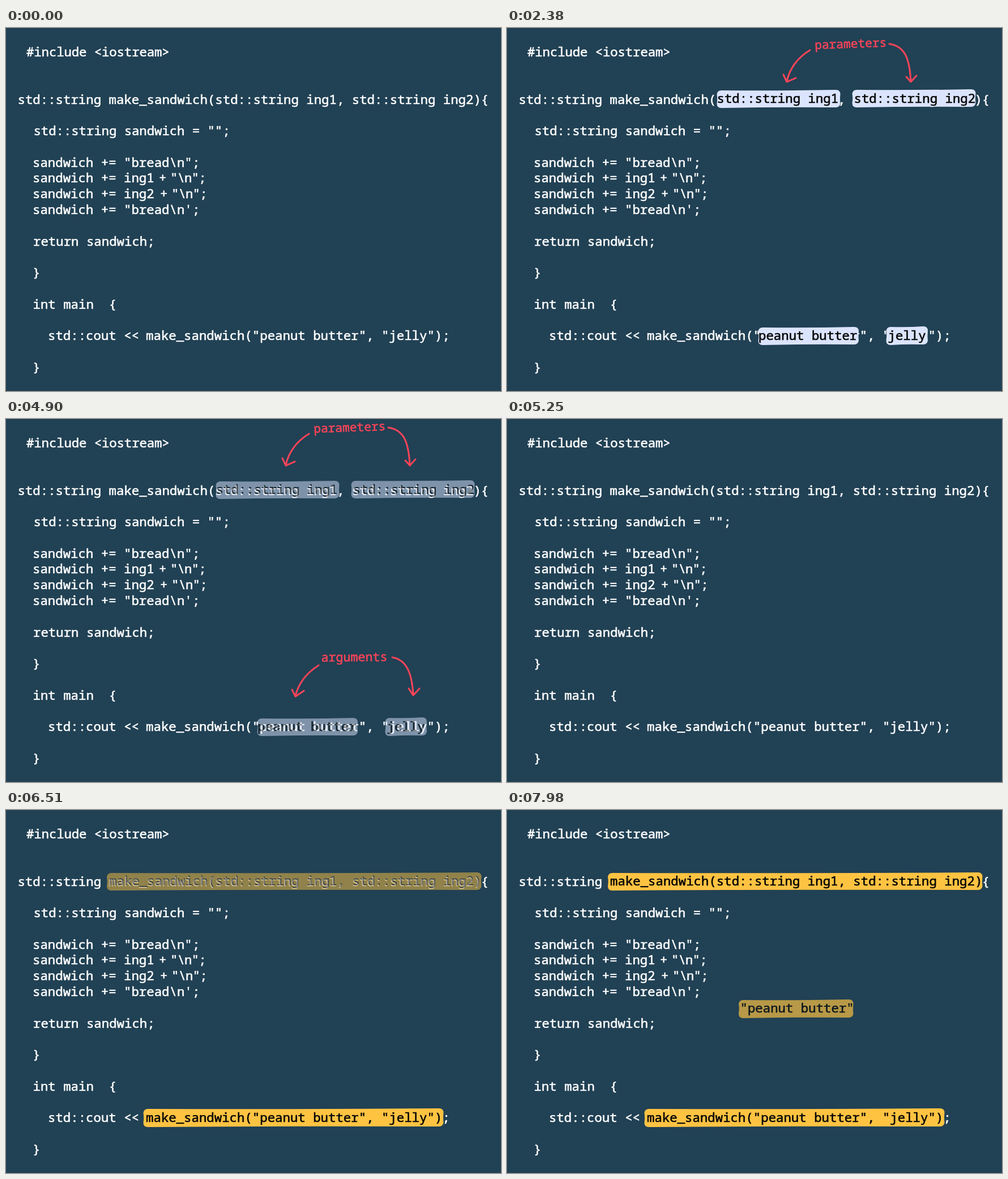
Animation of 874 by 640 pixels, one loop 8000 ms. Source, as an HTML page:

```html
<!DOCTYPE html>
<html lang="en">
<head>
<meta charset="utf-8">
<title>Parameters and arguments</title>
<style>
html, body { margin: 0; width: 100%; height: 100%; overflow: hidden; background: #214154; }
svg { display: block; }
text {
  font: 22.36px "Noto Sans Mono", "DejaVu Sans Mono", monospace; white-space: pre;
  stroke-width: .6px; stroke-linejoin: round;
}
</style>
</head>
<body>
<svg id="stage" width="874" height="640" viewBox="0 0 874 640"></svg>
<script>
const LOOP = 8000, STEP = 70;
const LAVENDER = '#dbe4fd', YELLOW = '#ffc342', RED = '#fa4459';
const stage = document.getElementById('stage');

function add(parent, tag, attrs = {}, content = '') {
  const node = document.createElementNS('http://www.w3.org/2000/svg', tag);
  for (const key in attrs) node.setAttribute(key, attrs[key]);
  node.textContent = content;
  return parent.appendChild(node);
}

const row = n => 50.2 + 27.78 * n;

// A thin outline gives the letters a marker-like weight
function write(parent, x, y, content, fill = '#fff', more = {}) {
  return add(parent, 'text', { x, y, fill, stroke: fill, ...more }, content);
}

// Rounded box with gently uneven edges
function bubble(parent, x, y, w, h, fill) {
  const r = 8, right = x + w, low = y + h, mid = x + w / 2;
  add(parent, 'path', { fill, d: `M${x + r} ${y + 1}
    Q${mid} ${y + 2} ${right - r} ${y} Q${right} ${y} ${right} ${y + r}
    Q${right - 1} ${y + h / 2} ${right} ${low - r} Q${right - 1} ${low - 1} ${right - r} ${low - 1}
    Q${mid} ${low - 2} ${x + r} ${low} Q${x} ${low} ${x} ${low - r}
    Q${x + 1.5} ${y + h / 2} ${x} ${y + r} Q${x + 1} ${y + 1} ${x + r} ${y + 1}Z` });
}

function highlight(box, fill, x, y, content) {
  const group = add(stage, 'g');
  bubble(group, ...box, fill);
  write(group, x, y, content, '#050505');
  return group;
}

function callout(label, x, y, turn, size, paths) {
  const group = add(stage, 'g');
  write(group, x, y, label, RED, {
    'text-anchor': 'middle', transform: `rotate(${turn} ${x} ${y})`, style: `font-size:${size}px`
  });
  add(group, 'path', { d: paths, fill: 'none', stroke: RED, 'stroke-width': 3,
    'stroke-linecap': 'round', 'stroke-linejoin': 'round' });
  return group;
}

const call = 'make_sandwich("peanut butter", "jelly")';
const code = [
  [36, 0, '#include <iostream>', -.12],
  [20.5, 3, 'std::string make_sandwich(std::string ing1, std::string ing2){'],
  [48.5, 5, 'std::string sandwich = "";', -.07],
  [47, 7, 'sandwich += "bread\\n";'],
  [47, 8, 'sandwich += ing1'],
  [47, 9, 'sandwich += ing2'],
  [47, 10, 'sandwich += "bread\\n\';'],
  [48, 12, 'return sandwich;'],
  [47, 14, '}'],
  [47.5, 16, 'int main  {'],
  [74, 18, 'std::cout <<'],
  [247, 18, call + ';'],
  [47, 20, '}']
];
for (const [x, n, content, spacing = 0] of code) {
  write(stage, x, row(n), content, '#fff', { 'letter-spacing': spacing });
}
for (const n of [8, 9]) {
  write(stage, 247 + 2 * n + 7, row(n), '+');
  write(stage, 267 + 2 * n + 7, row(n), '"\\n";', '#fff', { 'letter-spacing': -.9 });
}

const params = [
  highlight([370.5, 109, 218, 32], LAVENDER, 370.5, row(3) - 1.5, 'std::string ing1'),
  highlight([609.5, 108, 218, 32], LAVENDER, 612.5, row(3) - 1.5, 'std::string ing2')
];
const args = [
  highlight([443.5, 527, 177.5, 32], LAVENDER, 444, row(18), 'peanut butter'),
  highlight([669.5, 526, 73.5, 33], LAVENDER, 672.5, row(18) - .5, 'jelly')
];
const callBox = highlight([242.5, 526, 530, 33], YELLOW, 247, row(18) - .5, call);
const headBox = highlight([178, 110, 661.5, 32], YELLOW, 182, row(3) - 1,
  'make_sandwich(std::string ing1, std::string ing2)');

const paramNote = callout('parameters', 607, 35, -2, 21.2,
  'M535 39Q502 59 494 94M488 82L494 95L510 88M675 28C704 32 711 57 713 94M705 86L713 95L723 84');
const argNote = callout('arguments', 615, 457, -.5, 21.7,
  'M552 464Q519 485 511 518M505 507L511 519L526 509M682 450C709 454 717 482 719 516M711 505L719 517L730 505');

const moving = highlight([409, 334, 202.5, 33], YELLOW, 411.5, 357, '"peanut butter"');

const clamp = v => Math.max(0, Math.min(1, v));
const fade = (t, start) => clamp((t - start + 35) / 70);
const show = (node, alpha) => node.setAttribute('opacity', alpha);
const shift = (node, x, y) => node.setAttribute('transform', `translate(${x} ${y})`);

// Drops in from above at constant speed, then leaves the same way
function slide(node, t, arrive, speed) {
  const leave = 4879;
  const y = t < leave ? Math.min(0, (t - arrive) * speed) : (leave - t) * speed;
  shift(node, 0, y);
}

function draw(now) {
  const t = Math.floor(now % LOOP / STEP) * STEP;
  const gone = fade(t, 4900);
  for (const node of params) show(node, fade(t, 910) - gone);
  for (const node of args) show(node, fade(t, 2310) - gone);
  show(callBox, fade(t, 5880));
  show(headBox, fade(t, 6510));
  slide(paramNote, t, 1706, .615);
  slide(argNote, t, 3030, 1.42);

  const left = (7980 - t) / 280;
  shift(moving, 22 * left, 159 * left);
  show(moving, t < 7700 ? 0 : .68 * (t - 7630) / 350);
  requestAnimationFrame(draw);
}
requestAnimationFrame(draw);
</script>
</body>
</html>
```
